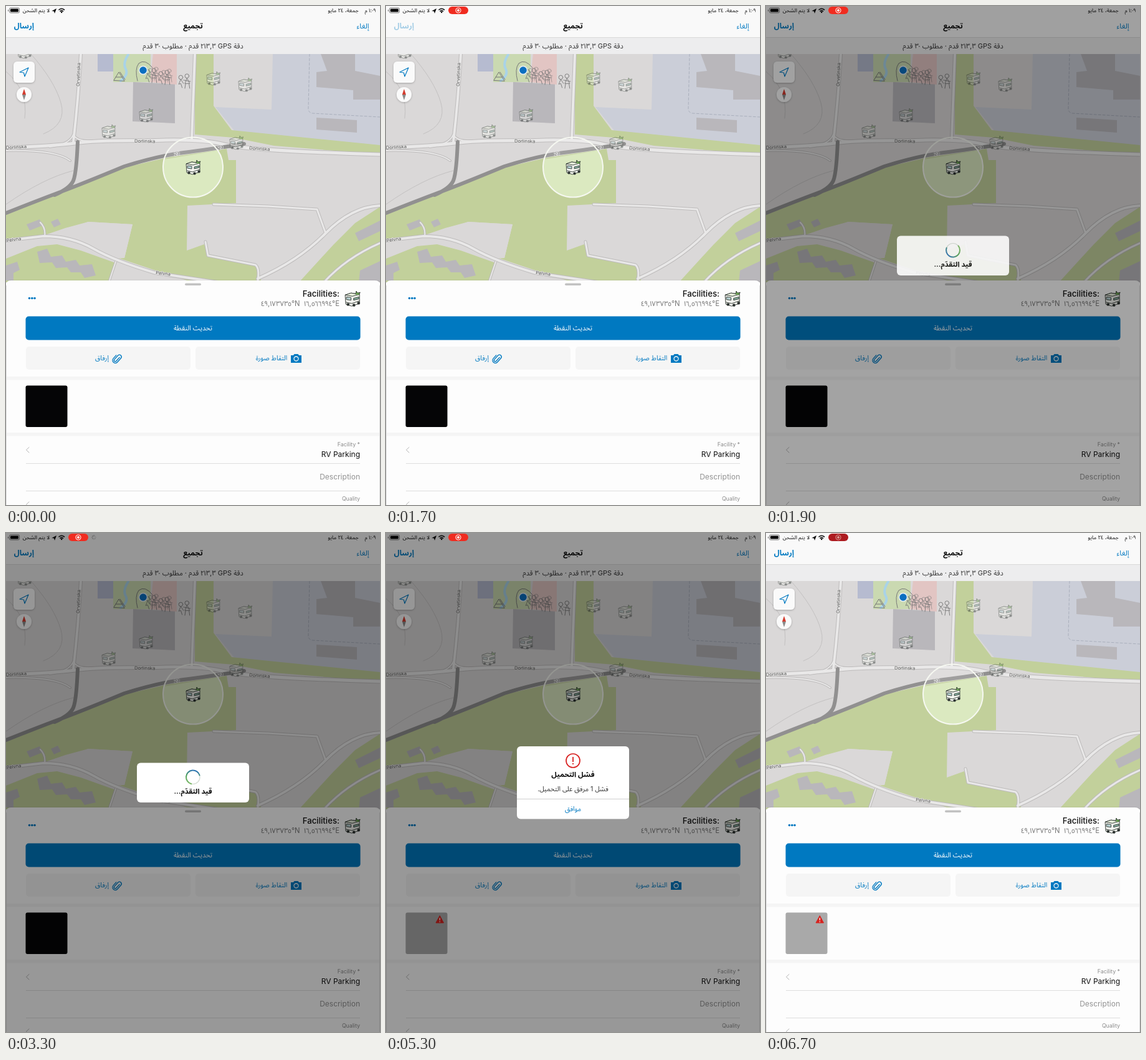
An HTML page for the animation above (6800 ms loop, 600 by 800 pixels).

```html
<!DOCTYPE html>
<html lang="ar">
<head>
<meta charset="utf-8">
<style>
html, body { margin: 0; width: 100%; height: 100%; overflow: hidden; background: #fdfdfd; }
svg { display: block; width: 600px; height: 800px; font-family: Inter, "Noto Sans Arabic", "DejaVu Sans", sans-serif; }
.ar { direction: rtl; }
.blue { fill: #0079c1; }
.line { fill: none; stroke-linecap: round; stroke-linejoin: round; }
.green { fill: #c2d09b; }
.block { fill: #b9b7bb; }
.street { font-size: 7.5px; fill: #555; stroke: #e6e5e4; stroke-width: 1.5; paint-order: stroke; }
</style>
</head>
<body>
<svg viewBox="0 0 600 800">
  <defs>
    <clipPath id="mapClip"><rect y="77" width="600" height="366"/></clipPath>
    <filter id="soft" x="-20%" y="-20%" width="140%" height="140%"><feDropShadow dx="0" dy="1" stdDeviation="1.5" flood-opacity=".25"/></filter>
    <linearGradient id="arcFill"><stop stop-color="#2f75b5"/><stop offset=".5" stop-color="#4fa15a"/><stop offset="1" stop-color="#7cb968"/></linearGradient>
    <g id="van" stroke="#333b36" stroke-width=".9" stroke-linejoin="round">
      <path d="M1 6 L10 3 L23 5 L23 19 L11 23 L2 20Z" fill="#f4f5f0"/>
      <path d="M1 6 L10 3 L23 5 L12 8Z" fill="#e6eedb"/>
      <path d="M14 11 L22 9 V12 L14 14Z" fill="#86aea0"/>
      <path d="M3 9 L10 10 V14 L3 13Z" fill="#b9d4d6"/>
      <path d="M2 17 L11 19 L23 15" fill="none"/>
      <path d="M17 5 L18 0 L20 3 L24 2 L22 6" fill="#6da653"/>
      <path d="M4 19 h3 v3 h-3z M13 20 h3 v3 h-3z M20 17 h3 v3 h-3z" fill="#252a2b"/>
    </g>
    <g id="camper" class="line" stroke="#777" stroke-width=".9">
      <circle cx="4" cy="4" r="3"/><circle cx="13" cy="2" r="3"/>
      <path d="M4 7 L1 14 L4 13 L6 19 M4 7 L8 13 M13 5 L10 13 L17 13 L13 5 M11 13 L10 20 M16 13 L17 20 M8 8 L18 10"/>
    </g>
  </defs>

  <g id="map" clip-path="url(#mapClip)">
    <rect y="77" width="600" height="366" fill="#dad8d8"/>
    <path class="green" d="M0 335 L90 298 L190 259 L262 242 L354 229 L357 247 H369 V316 L291 320 L290 392 L318 382 L326 398 L402 415 L410 443 H300 L240 424 L180 404 L190 404 L203 350 L132 346 L95 356 L60 368 L0 376Z"/>
    <path fill="#dad8d8" d="M72 368 L132 346 L203 350 L190 404 L175 405 L120 385Z"/>
    <path fill="#cbced8" d="M428 77 H600 V225 L368 202 L336 162 L426 166Z"/>
    <path class="green" d="M303 77 H333 V160 L362 199 L600 223 V238 L430 224 L365 211 L303 206Z
      M0 405 L50 385 L82 382 L120 392 L176 412 L166 443 H0Z
      M600 322 L560 348 L525 383 L470 443 H600Z"/>
    <path class="block" d="M505 77 H560 V104 L600 112 V150 L557 150 V135 L498 130 V106 L515 104Z M498 179 L563 183 V203 L498 198Z
      M204 122 L271 125 L271 188 L203 185Z
      M33 350 L54 342 L58 352 L38 360Z M72 346 L83 341 L88 350 L77 355Z
      M0 416 L18 410 L22 423 L12 428 L12 440 H0Z
      M50 394 L66 389 L72 402 L90 400 L96 410 L112 407 L118 416 L138 414 L144 432 L126 436 L120 427 L104 427 L98 419 L80 420 L74 411 L54 412Z
      M560 364 L600 344 V361 L566 377Z M568 424 L600 409 V443 H566Z"/>
    <path fill="#b6bbd0" d="M147 77 H172 V105 H147Z"/>
    <path fill="#cad9b1" d="M172 77 H232 V122 H172Z"/>
    <path class="line" stroke="#a9d3e8" stroke-width="4" d="M196 78 Q187 92 192 101 T184 120"/>
    <path fill="#e2c5c3" d="M236 77 H274 V126 L231 122Z"/>
    <g class="line">
      <path stroke="#c3c1c1" d="M40 77 Q78 120 88 155 T60 205 M0 105 Q36 135 30 180 M0 318 Q60 276 108 264"/>
      <path stroke="#aab0bd" stroke-dasharray="4 3" d="M487 77 L485 165 Q485 171 492 172 L600 178"/>
      <g id="roads"></g>
      <path stroke="#919090" stroke-width="6" d="M0 332 Q45 314 85 299 T190 257 Q245 240 285 235 T382 221 M115 218 Q113 268 108 280 T78 303"/>
    </g>
    <g id="streets"></g>
    <path fill="#ebffd7" fill-opacity=".46" d="M253.600 246 L339.800 231.600 A48 48 0 1 1 253.600 246Z"/>
    <circle cx="300" cy="258.500" r="48" fill="#fff" fill-opacity=".13" stroke="#f6f8f1" stroke-width="2"/>
    <path class="line" stroke="#777" d="M173 119 L181 106 L190 120Z M176 114 H187 M183 106 L191 118 M211 120 Q206 101 213 92 Q223 84 235 99"/>
    <g id="markers"></g>
    <circle cx="220" cy="103" r="6.500" fill="#0b6fc0" stroke="#e8eef4" stroke-width="1.500"/>
  </g>

  <g filter="url(#soft)">
    <rect x="12" y="89" width="34" height="34" rx="6" fill="#fafafa"/>
    <circle cx="29" cy="142" r="12" fill="#fafafa"/>
  </g>
  <path class="line" stroke="#0079c1" stroke-width="1.200" d="M22 106 L36 99 L30 113 L28.500 107Z"/>
  <path fill="#d33a2d" d="M26 142 L29 133 L32 142Z"/><path fill="#8b8b8b" d="M26 142 H32 L29 151Z"/>

  <rect width="600" height="51" fill="#f9f9f9"/>
  <rect y="50" width="600" height="27" fill="#ededee"/>
  <path stroke="#d9d9d9" d="M0 50.500 H600"/>
  <g id="status">
    <rect x="5.500" y="3" width="16" height="8" rx="2" fill="none" stroke="#777"/>
    <rect x="7" y="4.500" width="13" height="5" rx="1"/><path d="M3.500 6 v2.500" stroke="#777"/>
    <path d="M73.500 8 L81 4 L78 12 L77 8.500Z"/>
    <path class="line" stroke="#111" stroke-width="1.600" d="M85 6 Q89 2.500 93.500 6 M87 8.300 Q89 6.500 91.500 8.300"/><circle cx="89.200" cy="10" r="1.200"/>
  </g>

  <path filter="url(#soft)" fill="#fdfdfd" d="M0 800 V448 Q0 440 8 440 H592 Q600 440 600 448 V800Z"/>
  <rect x="287" y="444.500" width="26" height="3.500" rx="1.700" fill="#c2c2c2"/>
  <g class="blue"><circle cx="37.500" cy="468.500" r="1.800"/><circle cx="41.800" cy="468.500" r="1.800"/><circle cx="46" cy="468.500" r="1.800"/></g>
  <use href="#van" transform="translate(543 457) scale(1.05)"/>
  <rect class="blue" x="31.500" y="497.500" width="537" height="38" rx="5"/>
  <g fill="#f5f5f5">
    <rect x="32" y="546" width="264" height="37" rx="5"/><rect x="304" y="546" width="264" height="37" rx="5"/>
    <rect y="594" width="600" height="5.500"/><rect y="684" width="600" height="5.500"/>
  </g>
  <path class="blue" d="M457 560 H461 L462.500 558 H468.500 L470 560 H474 V572 H457Z"/>
  <circle cx="465.500" cy="565.500" r="3.500" fill="none" stroke="#f5f5f5" stroke-width="1.300"/>
  <path class="line" stroke="#0079c1" stroke-width="1.400" transform="translate(178 565) rotate(42)" d="M2 -4 V4 A2 2 0 0 1 -2 4 V-5 A3.300 3.300 0 0 1 4.500 -5 V4 A4.300 4.300 0 0 1 -4.300 4 V-3"/>
  <rect id="thumb" x="31.500" y="608.500" width="67" height="66.500" rx="3"/>
  <g id="warning">
    <path d="M86.300 613.500 L92.500 625 H80Z" fill="#d6231f" stroke="#d6231f" stroke-linejoin="round"/>
    <path d="M86.300 617 V621 M86.300 622.500 V624" stroke="#fff" stroke-width="1.200"/>
  </g>
  <path stroke="#dedede" d="M32 733.500 H568 M32 777.500 H568"/>
  <path class="line" stroke="#b5b5b5" d="M37 707.500 L32.500 711.700 L37 716 M37 795 L32.500 799.200 L37 803.500"/>
  <path stroke="#ddd" d="M.5 448 V800 M599.500 448 V800"/>
  <g id="texts"></g>

  <rect id="dim" width="600" height="800"/>
  <g id="pill">
    <rect id="pillBody" x="100" y="1" width="32" height="12" rx="6"/>
    <g id="pillIcon"><circle cx="116" cy="7" r="4" fill="none" stroke="currentColor" stroke-width="1.100"/><circle cx="116" cy="7" r="2" fill="currentColor"/></g>
  </g>
  <g id="network" class="line" stroke="#555"></g>

  <g id="progress">
    <rect x="210" y="368.500" width="180" height="63.500" rx="6" fill="#fff"/>
    <circle cx="300" cy="391.500" r="11" fill="none" stroke="#d5ddd3" stroke-width="1.200"/>
    <path id="arc" class="line" stroke="url(#arcFill)" stroke-width="2" d="M311 391.500 A11 11 0 1 1 294.500 382"/>
  </g>
  <g id="failure">
    <rect x="210" y="342" width="180" height="116.500" rx="6" fill="#fff"/>
    <circle cx="300" cy="365" r="11" fill="none" stroke="#d8201f" stroke-width="1.700"/>
    <path stroke="#d8201f" stroke-width="1.800" d="M300 359 V367 M300 369 V371"/>
    <path stroke="#cfcfcf" d="M210 426.500 H390"/>
  </g>
</svg>
<script>
const LOOP = 6800;
const $ = id => document.getElementById(id);

function add(parent, tag, attrs, content) {
  const node = document.createElementNS("http://www.w3.org/2000/svg", tag);
  for (const key in attrs) node.setAttribute(key, attrs[key]);
  if (content) node.textContent = content;
  return $(parent).appendChild(node);
}

// Centred Arabic label
function arabic(parent, content, x, y, size, fill = "#111", weight = 400) {
  return add(parent, "text", { class: "ar", x, y, fill, "font-size": size, "font-weight": weight, "text-anchor": "middle" }, content);
}

function field(content, x, y, size, fill, weight = 400) {
  add("texts", "text", { x, y, fill, "font-size": size, "font-weight": weight, "text-anchor": "end" }, content);
}

const roads = [
  ["M120 77 Q116 150 108 218", 6],
  ["M0 227 Q70 225 110 220 T224 216 Q310 212 350 222 T600 238", 7],
  ["M303 77 L298 213", 6],
  ["M0 232 Q80 230 103 248 M70 226 Q102 222 108 206 M108 206 Q114 218 140 216", 4],
  ["M0 376 L60 369 Q105 369 140 389 T240 428 L340 443", 6],
  ["M62 369 Q64 356 55 347 M176 410 L165 443", 4],
  ["M333 318 L420 321 L499 326 L512 362", 5],
  ["M320 378 L324 400 L400 415 Q407 420 404 440", 5],
  ["M404 437 Q470 408 512 365 T600 320", 6],
  ["M510 443 Q545 404 600 380", 5]
];
for (const [stroke, inner] of [["#bdbbbb", 0], ["#e9e8e8", 2]])
  for (const [d, width] of roads) add("roads", "path", { d, stroke, "stroke-width": width - inner });

const street = (name, x, y, angle) =>
  add("streets", "text", { class: "street", transform: `translate(${x} ${y}) rotate(${angle})` }, name);
street("Orvetinska", 118, 129, -88);
street("Dorlinska", 0, 230, -4);
street("Dorlinska", 206, 219, 1);
street("Dorlinska", 390, 230, 4);
street("Pelvna", 1, 379, -9);
street("Pelvna", 240, 430, 6);
street("23", 270, 240, -7);
street("23", 340, 230, -7);

for (const [x, y] of [[332, 116], [383, 126], [164, 201], [224, 175], [369, 219], [29, 73]])
  add("markers", "use", { href: "#van", transform: `translate(${x - 11} ${y - 11}) scale(.95)`, opacity: .45 });
add("markers", "use", { href: "#van", transform: "translate(288 247)" });
for (const [x, y, red] of [[223, 101, 1], [244, 104, 1], [276, 110, 0]]) {
  add("markers", "use", { href: "#camper", transform: `translate(${x} ${y}) scale(1.1)`, opacity: .9 });
  if (red) add("markers", "use", { href: "#camper", transform: `translate(${x + 5} ${y - 2})`, opacity: .6 });
}

const blue = "#0079c1";
arabic("status", "لا يتم الشحن", 48.5, 10, 8.5);
arabic("status", "١:٠٩ م", 584.5, 10, 8.5);
arabic("status", "جمعة، ٢٤ مايو", 541, 10, 8.8);
arabic("texts", "إلغاء", 572.5, 36, 11.5, blue, 500);
arabic("texts", "تجميع", 300, 36, 12, "#111", 600);
const send = arabic("texts", "إرسال", 29, 36, 12, blue, 600);
arabic("texts", "دقة GPS ٢١٣,٣ قدم · مطلوب ٣٠ قدم", 300, 68, 11, "#333");
arabic("texts", "تحديث النقطة", 300, 520, 11, "#fff", 500);
arabic("texts", "التقاط صورة", 426, 568, 10.5, blue, 500);
arabic("texts", "إرفاق", 154, 568, 10.5, blue, 500);
field("Facilities:", 535, 466, 13.2, "#111", 500);
field("٤٩,١٧٣٧٣٥°N\u00a0\u00a0١٦,٥٦٦٩٩٤°E", 535, 481, 11.3, "#777");
field("Facility *", 568, 705.5, 8.8, "#8a8a8a");
field("RV Parking", 568, 722.5, 12, "#111");
field("Description", 568, 759, 12, "#929292");
field("Quality", 568, 793, 8.8, "#8a8a8a");
arabic("progress", "قيد التقدّم...", 300, 418, 11.5, "#111", 600);
arabic("failure", "فشل التحميل", 300, 391, 11.5, "#111", 600);
arabic("failure", "فشل 1 مرفق على التحميل.", 300, 414, 10.6, "#333");
arabic("failure", "موافق", 300, 446, 10.5, blue);

for (let i = 0; i < 8; i++)
  add("network", "path", { d: "M0 -2 V-3.500", transform: `rotate(${i * 45})`, opacity: .25 + i * .09 });

const ramp = (t, from, to) => Math.min(1, Math.max(0, (t - from) / (to - from)));
const show = (id, opacity) => $(id).setAttribute("opacity", opacity);

function draw(t) {
  const failed = t >= 4500;
  const enter = ramp(t, 1790, 1915);
  const leave = 1 - ramp(t, 5880, 6180);
  const pressed = t >= 6550;

  show("dim", .4 * enter * leave ** 2);
  show("progress", failed ? 0 : enter);
  show("failure", failed ? leave : 0);
  show("warning", failed ? 1 : 0);
  show("network", t >= 2500 && t < 4500 ? 1 : 0);
  show("pill", ramp(t, 100, 400));
  $("thumb").setAttribute("fill", failed ? "#a9a9a9" : "#050506");
  $("pillBody").setAttribute("fill", pressed ? "#ad1b20" : "#f02c20");
  $("pillIcon").style.color = pressed ? "#d99a94" : "#fff";
  send.setAttribute("opacity", t >= 1600 && t < 1800 ? .35 : 1);
  $("arc").setAttribute("transform", `rotate(${(t - 1900) * .36 - 40} 300 391.5)`);
  $("network").setAttribute("transform", `translate(141 7) rotate(${Math.floor(t / 100) * 45})`);
}

function tick() {
  draw(performance.now() % LOOP);
  requestAnimationFrame(tick);
}
tick();
</script>
</body>
</html>
```
